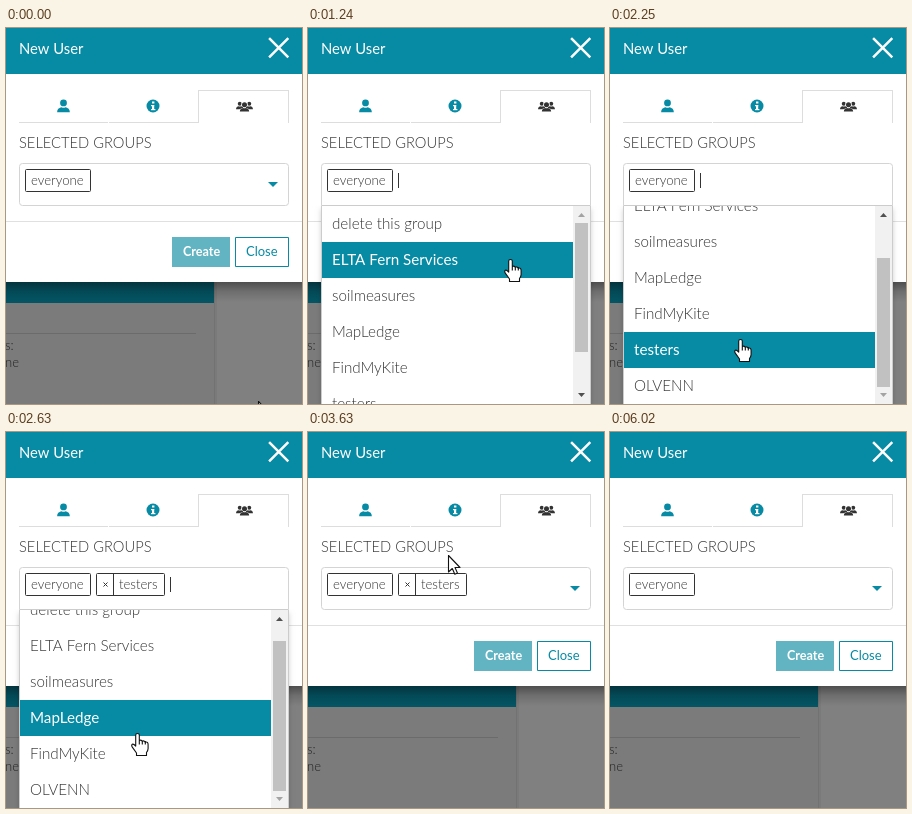
An HTML page with a canvas for the animation above (6100 ms loop, 296 by 376 pixels).

```html
<!DOCTYPE html>
<html lang="en">
<head>
<meta charset="utf-8">
<title>New User</title>
<style>
  html, body { margin: 0; width: 100%; height: 100%; overflow: hidden; background: #fff; }
  canvas { display: block; width: 296px; height: 376px; }
</style>
</head>
<body>
<canvas id="stage" width="296" height="376"></canvas>
<script>
const ctx = document.getElementById('stage').getContext('2d');
const LOOP = 6100, STEP = 77.2;
const TEAL = '#078aa3', INK = '#333';
const ROW = 36, LIST_TOP = 178, LIST_H = 198;
const GROUPS = ['delete this group', 'ELTA Fern Services', 'soilmeasures', 'MapLedge',
  'FindMyKite', 'testers', 'OLVENN'];

// Pointer stops: time, x, y
const PATH = [
  [0, 252, 373], [617, 264, 168], [695, 264, 165], [772, 264, 165], [849, 264, 160],
  [1003, 264, 160], [1390, 168, 270], [1467, 158, 286], [1544, 155, 290], [1853, 155, 290],
  [2239, 130, 311], [2548, 130, 311], [3088, 140, 127], [3165, 140, 122], [3474, 140, 122],
  [3860, 140, 126], [4400, 99, 149], [4940, 99, 149], [5558, 252, 360]
];
const CLICKS = [[840, 1000], [2400, 2630], [3250, 3410], [4550, 4720]];

const clamp = v => Math.max(0, Math.min(1, v));
const smooth = v => v * v * (3 - 2 * v);
const within = (t, a, b) => t >= a && t < b;
const inside = (p, x, y, w, h) => p.x >= x && p.x < x + w && p.y >= y && p.y < y + h;

function rect(x, y, w, h, color) {
  ctx.fillStyle = color;
  ctx.fillRect(x, y, w, h);
}

function box(x, y, w, h, r, stroke, fill) {
  ctx.beginPath();
  ctx.roundRect(x + .5, y + .5, w - 1, h - 1, r);
  if (fill) { ctx.fillStyle = fill; ctx.fill(); }
  ctx.strokeStyle = stroke;
  ctx.lineWidth = 1;
  ctx.stroke();
}

function text(s, x, y, size, color = INK, weight = 300) {
  ctx.font = `${weight} ${size}px Lato, "Open Sans", sans-serif`;
  ctx.textBaseline = 'alphabetic';
  ctx.fillStyle = color;
  ctx.fillText(s, x, y);
}

function disc(x, y, r, color) {
  ctx.beginPath();
  ctx.arc(x, y, r, 0, Math.PI * 2);
  ctx.fillStyle = color;
  ctx.fill();
}

function shape(points, color) {
  ctx.beginPath();
  points.forEach(([x, y]) => ctx.lineTo(x, y));
  ctx.closePath();
  ctx.fillStyle = color;
  ctx.fill();
}

function cross(x, y, r, width, color) {
  ctx.beginPath();
  ctx.moveTo(x - r, y - r); ctx.lineTo(x + r, y + r);
  ctx.moveTo(x + r, y - r); ctx.lineTo(x - r, y + r);
  ctx.strokeStyle = color;
  ctx.lineWidth = width;
  ctx.stroke();
}

function person(x, y, k, color) {
  ctx.save();
  ctx.translate(x, y);
  ctx.scale(k, k);
  disc(0, -3.1, 3.4, color);
  ctx.beginPath();
  ctx.moveTo(-6.3, 6.2);
  ctx.bezierCurveTo(-6.3, 2.6, -4, 1.8, -2, 1.2);
  ctx.quadraticCurveTo(0, 2.2, 2, 1.2);
  ctx.bezierCurveTo(4, 1.8, 6.3, 2.6, 6.3, 6.2);
  ctx.fill();
  ctx.restore();
}

function pointerAt(t) {
  const q = Math.floor((t + 9) / STEP) * STEP;
  let i = 0;
  while (i < PATH.length - 2 && q > PATH[i + 1][0]) i++;
  const [t0, x0, y0] = PATH[i], [t1, x1, y1] = PATH[i + 1];
  const k = smooth(clamp((q - t0) / (t1 - t0)));
  return { x: x0 + (x1 - x0) * k, y: y0 + (y1 - y0) * k };
}

function page() {
  rect(0, 240, 296, 136, '#808080');
  rect(0, 240, 208, 136, '#7b7b7b');
  rect(208, 240, 1, 136, '#727272');
  rect(209, 240, 2, 136, '#7a7a7a');
  rect(0, 240, 208, 35, '#045564');
  rect(0, 305, 190, 1, '#6b6b6b');
  text('s:', -1, 322, 13, '#222');
  text('ne', -1, 339, 13, '#222');
  const g = ctx.createLinearGradient(0, 253, 0, 274);
  g.addColorStop(0, 'rgba(0,0,0,.42)');
  g.addColorStop(.5, 'rgba(0,0,0,.14)');
  g.addColorStop(1, 'rgba(0,0,0,0)');
  rect(0, 253, 296, 21, g);
}

function modal() {
  rect(0, 0, 296, 254, '#fff');
  rect(0, 0, 296, 46, TEAL);
  text('New User', 13, 26, 14.8, '#fff', 400);
  cross(272.7, 19.7, 9.6, 2.5, '#fff');

  rect(13, 94, 89, 1, '#ddd');
  rect(103, 94, 90, 1, '#ddd');
  rect(192, 62, 91, 1, '#ddd');
  rect(192, 62, 1, 33, '#ddd');
  rect(282, 62, 1, 33, '#ddd');
  person(57.5, 78, 1, TEAL);
  disc(147, 78, 6.5, TEAL);
  rect(146, 73.5, 2.4, 2, '#fff');
  rect(145, 77, 3.2, 1.2, '#fff');
  rect(146, 77, 2.2, 5, '#fff');
  rect(145, 81, 4.4, 1.2, '#fff');
  person(233.8, 77.6, .6, INK);
  person(243.2, 77.6, .6, INK);
  person(238.5, 79, .92, '#fff');
  person(238.5, 79, .74, INK);

  text('SELECTED GROUPS', 13, 120, 14.7);
  rect(0, 193, 296, 1, '#e0e0e0');
  rect(166, 209, 58, 30, '#62b4c3');
  text('Create', 177, 228, 12.6, '#fff', 700);
  box(229, 209, 54, 30, 0, TEAL, '#fff');
  text('Close', 240, 228, 13, TEAL, 400);
}

function select(s, p) {
  if (s.ring) {
    ctx.save();
    ctx.shadowColor = 'rgba(7,138,163,.55)';
    ctx.shadowBlur = 5;
    box(13, 135, 270, 43, 3, '#8cc5d0', '#fff');
    ctx.restore();
  }
  box(13, 135, 270, 43, s.open ? [3, 3, 0, 0] : 3, s.ring ? '#8cc5d0' : '#d4d4d4', '#fff');
  if (!s.open && inside(p, 13, 135, 270, 43)) rect(15, 177, 266, 1, '#bdbdbd');
  if (!s.open) shape([[262, 154], [272, 154], [267, 159]], TEAL);

  box(19, 141, 66, 23, 1, INK);
  text('everyone', 25, 157, 13.2);
  if (s.tagged) {
    const hot = inside(p, 90, 141, 17, 23);
    box(90, 141, 69, 23, 1, INK);
    rect(107, 141, 1, 23, INK);
    if (hot) rect(90, 141, 17, 23, INK);
    cross(99.5, 152.5, 2, 1, hot ? '#fff' : INK);
    text('testers', 113, 157, 13.2);
  }
  if (s.caret) rect(s.tagged ? 164 : 90, 145, 1, 15, INK);
}

function scrollbar(scroll, full) {
  const track = LIST_H - 34, max = full - LIST_H;
  const size = track * LIST_H / full;
  const top = LIST_TOP + 17 + (track - size) * scroll / max;
  rect(265, LIST_TOP, 17, LIST_H, '#f1f1f1');
  rect(267, Math.round(top), 13, Math.round(size), '#c1c1c1');
  const up = LIST_TOP + 11, down = LIST_TOP + LIST_H - 11;
  shape([[270, up], [277, up], [273.5, up - 4]], scroll > 0 ? '#505050' : '#a3a3a3');
  shape([[270, down], [277, down], [273.5, down + 4]], scroll < max ? '#505050' : '#a3a3a3');
}

function popup(s, p) {
  const items = s.tagged ? GROUPS.filter(g => g !== 'testers') : GROUPS;
  const full = items.length * ROW;
  const slide = Math.round((s.open - 1) * LIST_H);
  const over = inside(p, 14, LIST_TOP, 251, LIST_H) && s.open === 1;
  const focus = over ? Math.floor((p.y - LIST_TOP + s.scroll) / ROW) : 0;

  ctx.save();
  ctx.beginPath();
  ctx.rect(0, 177, 296, 199);
  ctx.clip();
  ctx.translate(0, slide);
  ctx.save();
  ctx.shadowColor = 'rgba(0,0,0,.18)';
  ctx.shadowBlur = 5;
  ctx.shadowOffsetY = 4;
  rect(13, 177, 270, 200, '#fff');
  ctx.restore();
  box(13, 177, 270, 200, 0, '#ccc', '#fff');
  ctx.beginPath();
  ctx.rect(14, LIST_TOP, 268, LIST_H);
  ctx.clip();
  items.forEach((name, i) => {
    const y = LIST_TOP + i * ROW - s.scroll;
    const active = i === focus;
    if (active) rect(14, y, 251, ROW, TEAL);
    text(name, 24, y + 23, 15.2, active ? '#fff' : INK, active ? 400 : 300);
  });
  scrollbar(s.scroll, full);
  ctx.restore();
}

const ARROW = new Path2D('M0 0V16.5L3.8 13L6.3 18.8L9 17.6L6.5 12H11.5Z');
const HAND = new Path2D('M-1.8 1.5Q-1.8 0 0 0Q1.8 0 1.8 1.5V7Q3.2 6 4.8 7.6Q6.6 6.8 7.8 8.6' +
  'Q10.6 8 10.6 11V15Q10.6 17 9 19V22H-1V19.5L-5.2 13.6Q-6.4 11.6 -5.2 10.8Q-4 10 -1.8 12.6Z');

function outlined(path) {
  ctx.fillStyle = '#fff';
  ctx.fill(path);
  ctx.strokeStyle = '#111';
  ctx.lineWidth = 1.1;
  ctx.lineJoin = 'round';
  ctx.stroke(path);
}

function pointer(s, p) {
  const onClear = s.tagged && inside(p, 90, 141, 17, 23);
  const onField = inside(p, 13, 135, 270, 43);
  const onList = s.open && inside(p, 13, LIST_TOP, 270, LIST_H);
  const onButton = !s.open && inside(p, 229, 209, 54, 30);
  ctx.save();
  ctx.translate(Math.round(p.x) + .5, Math.round(p.y) + .5);
  if (onClear || onList || onButton || (onField && p.x > 245)) {
    outlined(HAND);
    ctx.beginPath();
    for (const x of [1.8, 4.8, 7.8]) {
      ctx.moveTo(x, 7.5);
      ctx.lineTo(x, 11);
    }
    ctx.stroke();
  } else if (onField) {
    rect(-.5, -7.5, 1, 16, '#111');
    rect(-3.5, -7.5, 7, 1, '#111');
    rect(-3.5, 7.5, 7, 1, '#111');
  } else {
    outlined(ARROW);
  }
  ctx.restore();
}

function stateAt(t) {
  const opening = clamp((t - 860) / 230), closing = clamp((t - 3320) / 230);
  const focusStart = t < 2480 ? 930 : t < 4550 ? 2480 : 4550;
  const focused = within(t, 930, 3330) || within(t, 4550, 6020);
  const tagged = within(t, 2480, 4550);
  return {
    open: smooth(opening) * (1 - smooth(closing)),
    scroll: tagged ? 18 : within(t, 1710, 2480) ? 54 : 0,
    tagged,
    caret: focused && Math.floor((t - focusStart) / 530) % 2 === 0,
    ring: within(t, 4550, 6020),
    click: CLICKS.some(([a, b]) => within(t, a, b)),
    pointer: t < 5630
  };
}

function draw(t) {
  const s = stateAt(t);
  const p = s.pointer ? pointerAt(t) : { x: -99, y: -99 };
  page();
  modal();
  select(s, p);
  if (s.open) popup(s, p);
  if (s.click) disc(p.x, p.y, 11.5, 'rgba(255,255,0,.55)');
  if (s.pointer) pointer(s, p);
}

const start = performance.now();
function tick() {
  draw((performance.now() - start) % LOOP);
  requestAnimationFrame(tick);
}
tick();
</script>
</body>
</html>
```
